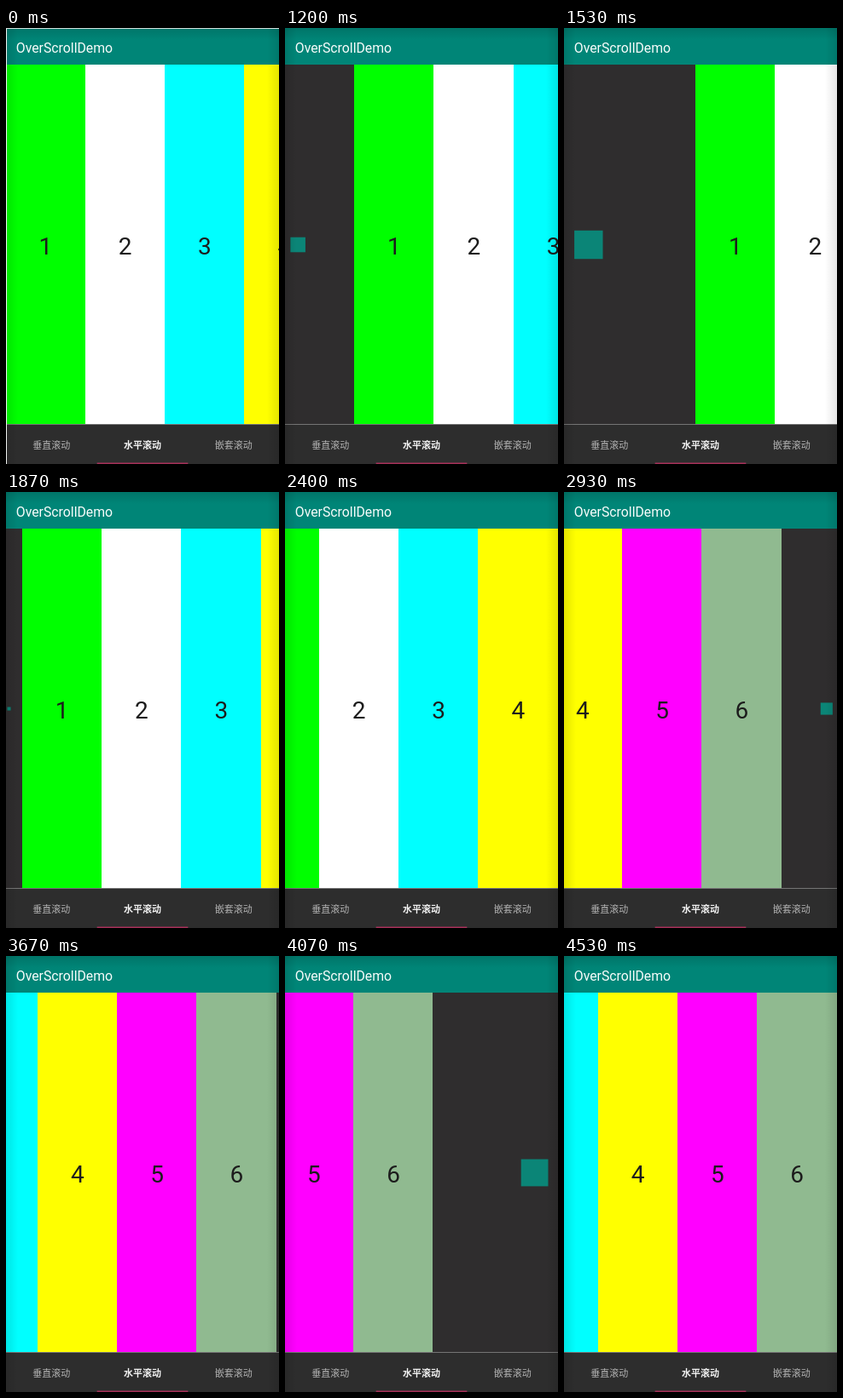
These frames come from a looping animation (320x512 px, 4.59 s). An HTML page with a canvas:

```html
<!DOCTYPE html>
<html lang="zh-CN">
<head>
<meta charset="utf-8">
<title>OverScrollDemo</title>
<style>
  html, body { margin: 0; width: 100%; height: 100%; overflow: hidden; background: #2f2d2e; }
  canvas { display: block; width: 320px; height: 512px; }
</style>
</head>
<body>
<canvas id="stage" width="320" height="512"></canvas>
<script>
const ctx = document.getElementById('stage').getContext('2d');
const W = 320, H = 512, TOP = 43, BOTTOM = 465;
const PANEL = 280 / 3, CONTENT = PANEL * 6;
const LOOP = 4590, TICK = 200 / 3;
const COLORS = ['#00ff00', '#ffffff', '#00ffff', '#ffff00', '#ff00ff', '#90ba90'];
const TABS = ['垂直滚动', '水平滚动', '嵌套滚动'];

const easeOut = n => p => 1 - (1 - p) ** n;
const easeInOut = p => (1 - Math.cos(Math.PI * p)) / 2;

// Each move: start tick, end tick, start offset, end offset, easing
const MOVES = [
  [18, 23, 81, 154, easeOut(2)],
  [26, 30, 154, -0.7, easeOut(3)],
  [36, 43, -53.6, -394, easeOut(2.15)],
  [43, 47, -394, -240.4, easeOut(3)],
  [55, 62, -243.2, -394, easeInOut],
  [62, 68, -394, -240.4, easeOut(3)]
];

function offsetAt(tick) {
  let x = -0.7;
  for (const [start, end, from, to, ease] of MOVES) {
    if (tick < start) break;
    x = from + (to - from) * ease(Math.min(1, (tick - start) / (end - start)));
  }
  return x;
}

function rect(x, y, w, h, fill) {
  ctx.fillStyle = fill;
  ctx.fillRect(x, y, w, h);
}

function text(str, x, y, font, fill, align = 'center') {
  ctx.font = font;
  ctx.fillStyle = fill;
  ctx.textAlign = align;
  ctx.fillText(str, x, y);
}

// The badge grows with the gap that overscrolling opens
function badge(gap, side) {
  if (gap < 4) return;
  const size = gap * 0.217, mid = gap * 0.187;
  const cx = side < 0 ? mid : W - mid;
  rect(cx - size / 2, 254.5 - size / 2, size, size, '#0b8577');
}

function shade(x0, y0, x1, y1, alpha) {
  const g = ctx.createLinearGradient(x0, y0, x1, y1);
  g.addColorStop(0, `rgba(0,0,0,${alpha})`);
  g.addColorStop(1, 'rgba(0,0,0,0)');
  rect(0, 0, W, H, g);
}

function draw(ms) {
  const tick = Math.floor((ms % LOOP + 3.4) / TICK);
  const x = offsetAt(tick);
  const edge = i => Math.round(x + i * PANEL);

  rect(0, 0, W, H, '#2f2d2e');
  COLORS.forEach((color, i) => {
    rect(edge(i), TOP, edge(i + 1) - edge(i), BOTTOM - TOP, color);
    text(i + 1, x + (i + 0.5) * PANEL + 0.3, 265.5, '28px Roboto, sans-serif', '#1c1c1c');
  });
  badge(x, -1);
  badge(W - x - CONTENT, 1);

  rect(0, 0, W, TOP, '#008577');
  text('OverScrollDemo', 11.8, 28.5, '15.8px Roboto, sans-serif', '#f8fcfb', 'left');

  rect(0, BOTTOM, W, H - BOTTOM, '#2d2d2d');
  rect(0, BOTTOM, W, 1, '#757575');
  TABS.forEach((label, i) => {
    const on = i === 1;
    text(label, W * (i + 0.5) / 3, 494,
      `${on ? 700 : 500} 11px "Noto Sans CJK SC", "Noto Sans CJK", sans-serif`,
      on ? '#f2f2f2' : '#b4b4b4');
  });
  rect(W / 3, 510.5, W / 3, 1.5, '#a8305a');

  shade(0, 0, 14, 0, 0.1);
  shade(W, 0, W - 14, 0, 0.1);
  shade(0, 0, 0, 14, 0.12);
  if (tick < 2) {
    rect(0, 0, 1, H, '#eef0ef');
    rect(0, 0, W, 1, '#d4dfdd');
  }
}

const begin = performance.now();
function frame() {
  draw(performance.now() - begin);
  requestAnimationFrame(frame);
}
frame();
</script>
</body>
</html>
```
